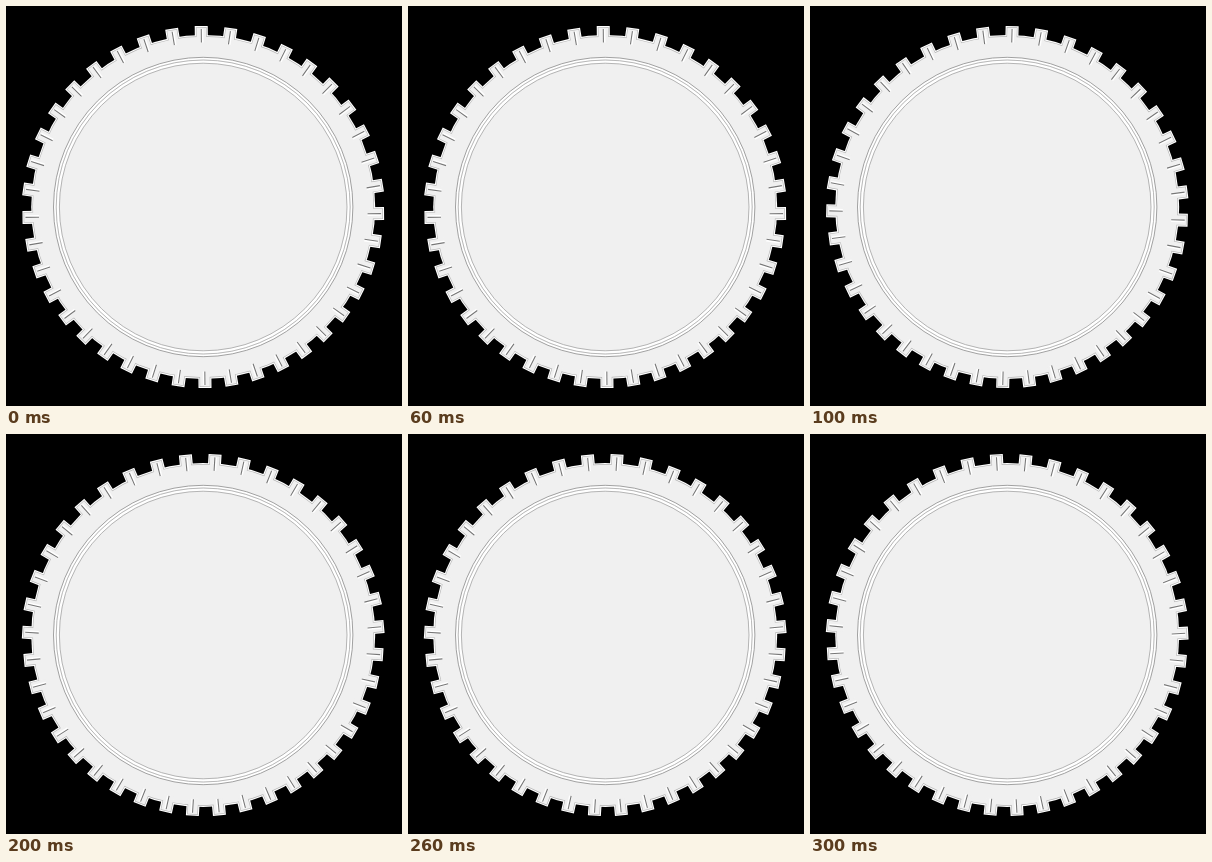
Write an HTML page with a canvas that moves like this. It is 396 px wide and 400 px high and loops after 400 ms.

```html
<!DOCTYPE html>
<html lang="en">
<head>
<meta charset="utf-8">
<title>Turning gear</title>
<style>
  html, body { margin: 0; width: 100%; height: 100%; overflow: hidden; background: #000; }
  canvas { display: block; width: 396px; height: 400px; }
</style>
</head>
<body>
<canvas id="stage" width="396" height="400"></canvas>
<script>
const ctx = document.getElementById('stage').getContext('2d');
const TEETH = 40, STEPS = 4, STEP_MS = 100;
const START = -0.6, STEP_DEG = 2.1;
const CX = 197.2, CY = 201;
const HUB_DROP = 8.5; // teeth radiate from a point below the disc centre
const ROOT = 172, TIP = 181;
const FACE = '#f0f0f0';

function ring(radius, width, color) {
  ctx.beginPath();
  ctx.arc(CX, CY, radius, 0, Math.PI * 2);
  ctx.lineWidth = width;
  ctx.strokeStyle = color;
  ctx.stroke();
}

function disc(radius, color) {
  ctx.beginPath();
  ctx.arc(CX, CY, radius, 0, Math.PI * 2);
  ctx.fillStyle = color;
  ctx.fill();
}

// Distance from the hub to a circle of the given radius, along a ray.
function reach(angle, radius) {
  const across = HUB_DROP * Math.sin(angle);
  return HUB_DROP * Math.cos(angle) + Math.sqrt(radius * radius - across * across);
}

function spokes(turn, from, to, width, color, shift = 0) {
  ctx.lineWidth = width;
  ctx.strokeStyle = color;
  ctx.beginPath();
  for (let i = 0; i < TEETH; i++) {
    const angle = (turn + i * 360 / TEETH) * Math.PI / 180;
    const s = Math.sin(angle), c = Math.cos(angle);
    for (const radius of [from, to]) {
      const d = reach(angle, radius);
      const x = CX + s * d + c * shift;
      const y = CY + HUB_DROP - c * d + s * shift;
      if (radius === from) ctx.moveTo(x, y);
      else ctx.lineTo(x, y);
    }
  }
  ctx.stroke();
}

function body(turn, inset, color) {
  disc(ROOT - inset, color);
  spokes(turn, ROOT - 8, TIP - inset, 13 - 2 * inset, color);
}

function draw(step) {
  const turn = START + step * STEP_DEG;
  ctx.fillStyle = '#000';
  ctx.fillRect(0, 0, 396, 400);

  body(turn, 0, '#fff');
  body(turn, 1.1, '#b4b4b4');
  body(turn, 1.7, FACE);

  spokes(turn, 164.5, 178, 3, '#fff', 0.6);
  spokes(turn, 164.5, 178, 1.1, '#777');

  ring(148.4, 2, '#fff');
  ring(145.3, 2.6, '#fff');
  ring(149.7, 0.8, '#8c8c8c');
  ring(147, 0.8, '#aaa');
  ring(143.8, 0.8, '#a4a4a4');
}

function tick() {
  draw(Math.floor(performance.now() / STEP_MS) % STEPS);
  requestAnimationFrame(tick);
}
tick();
</script>
</body>
</html>
```
